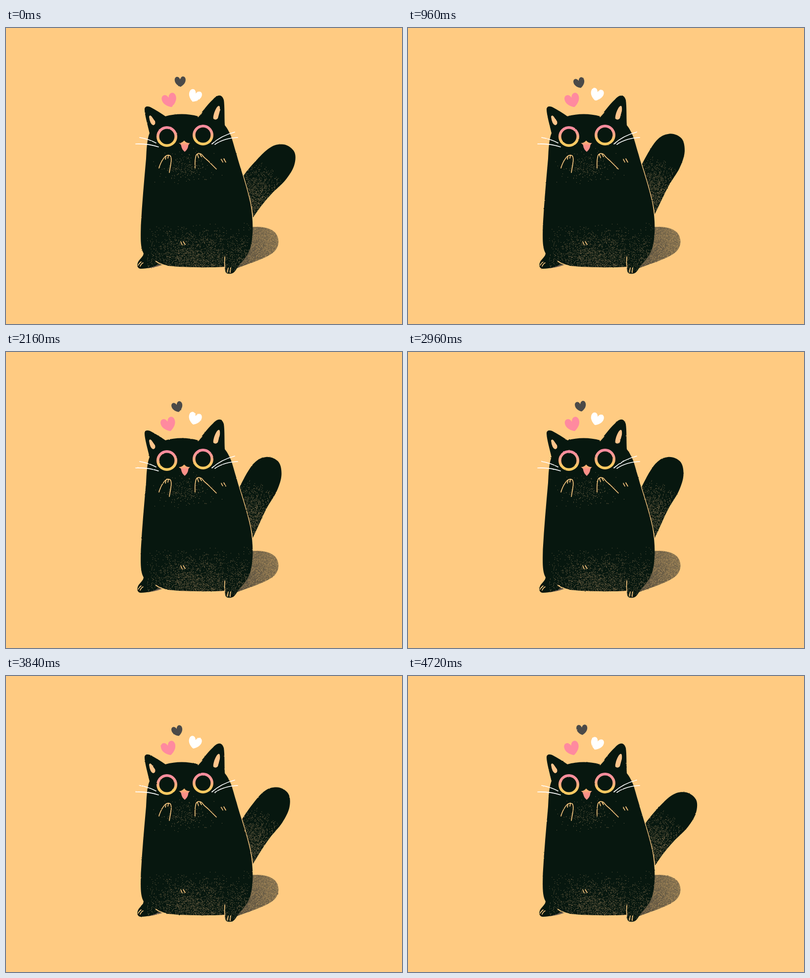
These frames come from a looping animation (800x600 px, 4800 ms). An HTML page:

```html
<!DOCTYPE html>
<html lang="en">
<head>
<meta charset="utf-8">
<title>Cat in love</title>
<style>
html, body { margin: 0; width: 100%; height: 100%; overflow: hidden; background: #ffcb82; }
svg { display: block; width: 100%; height: 100%; }
.line { fill: none; stroke-linecap: round; stroke-linejoin: round; }
</style>
</head>
<body>
<svg viewBox="0 0 800 600">
  <defs>
    <filter id="rough" filterUnits="userSpaceOnUse" x="250" y="85" width="350" height="425" color-interpolation-filters="sRGB">
      <feTurbulence id="noise" type="fractalNoise" baseFrequency=".25" numOctaves="2" seed="1"/>
      <feColorMatrix values="1 0 0 0 0  0 1 0 0 0  0 0 1 0 0  0 0 0 0 1" result="map"/>
      <feDisplacementMap in="SourceGraphic" in2="map" scale="1.8" xChannelSelector="R" yChannelSelector="G"/>
    </filter>
    <linearGradient id="iris" x1="0" y1="0" x2="0" y2="1">
      <stop offset="0" stop-color="#fb8b9f"/>
      <stop offset=".35" stop-color="#fb9f90"/>
      <stop offset=".8" stop-color="#fbca62"/>
    </linearGradient>
    <linearGradient id="nose" x1="0" y1="0" x2="0" y2="1">
      <stop offset=".1" stop-color="#fdb970"/>
      <stop offset=".45" stop-color="#fb8f88"/>
    </linearGradient>
    <linearGradient id="shade" x1="480" y1="470" x2="548" y2="420" gradientUnits="userSpaceOnUse">
      <stop offset="0" stop-color="#5b513f"/>
      <stop offset="1" stop-color="#79694c"/>
    </linearGradient>
    <path id="body" d="M290 213C287 200 280 175 280 165C280 159 285 158 291 160C303 166 313 173 322 179
      C342 173 368 173 388 179C396 171 406 156 418 145C428 134 436 134 440 146C442 160 441 180 442 197
      C447 203 452 212 456 223C460 236 462 244 466 257C472 280 487 322 494 357C500 390 500 425 493 448
      C487 465 475 474 466 488C461 496 458 499 449 498C442 497 443 491 442 484C410 486 375 485 350 484
      C333 483 320 481 309 479C299 484 287 488 272 488C265 487 264 481 267 474C271 467 277 464 278 457
      C271 445 272 425 272.5 400C275 355 279 310 283 265C284 245 285 225 290 213Z"/>
    <path id="heart" d="M0 1C-.5 .78-1.08 .25-1-.4C-.92-1.02-.2-1.08 0-.36C.2-1.08 .92-1.02 1-.4C1.08 .25 .5 .78 0 1Z"/>
    <path id="shadow" d="M480 408C497 400 530 401 543 414C553 425 553 442 542 453C528 466 500 474 466 487Z"/>
    <clipPath id="bodyClip"><use href="#body"/></clipPath>
    <clipPath id="shadowClip"><use href="#shadow"/></clipPath>
    <clipPath id="tailClip"><path id="tailEdge"/></clipPath>
  </defs>

  <rect width="800" height="600" fill="#ffcb82"/>

  <g filter="url(#rough)">
    <use href="#shadow" fill="url(#shade)"/>
    <path d="M275 487Q295 488 316 480L300 476Z" fill="#6b5c50"/>
  </g>
  <path id="shadowGrain" clip-path="url(#shadowClip)" fill="#a88a59"/>

  <path id="tail" fill="#07170f" filter="url(#rough)"/>
  <g clip-path="url(#tailClip)"><path id="tailGrain" fill="#786849"/></g>

  <g filter="url(#rough)">
    <path class="line" d="M466 257C472 280 487 322 494 357C497 370 498 382 498 392" stroke="#ffcb82" stroke-width="2.6"/>
    <use href="#body" fill="#07170f"/>
  </g>
  <path id="bodyGrain" clip-path="url(#bodyClip)" fill="#786849"/>

  <g filter="url(#rough)">
    <path d="M289 180Q290 175 294 179L301 189Q303 196 297 197Q291 195 289 180Z
      M429 158Q433 156 432 168L428 183Q424 188 419 184Q418 180 421 171Q425 160 429 158Z" fill="#ffc58c"/>
    <g fill="#07170f" stroke="url(#iris)" stroke-width="5.6">
      <circle cx="325" cy="220" r="18.2"/>
      <circle cx="398" cy="217" r="18.2"/>
    </g>
    <path d="M349 233Q355 234 360 228Q364 234 372 233Q368 236 368 240Q367 246 361 251Q355 246 354 239Q354 236 349 233Z" fill="url(#nose)"/>
    <g class="line" stroke="#ffcb82" stroke-width="1.6">
      <path d="M309 284Q313 270 321 261Q326 256 332 259Q335 263 333 275L330 293M323 261l-1 5M328 259l-1 5"/>
      <path d="M382 284Q381 268 384 258Q388 252 395 256Q400 263 408 269L425 286M387 257l2 6M392 256l3 5"/>
      <path d="M435 266l3 6M440 265l4 7M353 433l3 7M358 433l4 6"/>
      <path d="M303 473Q311 479 325 482M442 464Q441 475 442 485M388 180L396 171"/>
      <path d="M267 481Q269 477 273 474M271 483Q273 478 277 476M447 495Q448 490 449 486M453 496Q453 491 454 486"/>
    </g>
    <g class="line" stroke="#fff" stroke-width="1.7">
      <path d="M270 222Q288 225 303 233M262 235Q287 234 308 241"/>
      <path d="M416 235Q435 218 462 211M422 236Q441 223 468 222"/>
    </g>
    <use id="dark" href="#heart" fill="#4b4a48"/>
    <use id="pink" href="#heart" fill="#ff8a9f"/>
    <use id="white" href="#heart" fill="#fff"/>
  </g>
</svg>
<script>
const STEP = 80, LOOP = 4800, SWING = 800, DRIFT = 1600;
const PIVOT = [454, 362];
const $ = id => document.getElementById(id);
const wave = (t, period) => Math.cos(2 * Math.PI * t / period);

// Tail outline at its lowest, from the left root round the tip
const tailPoints = [[466, 335], [481, 299], [530, 247], [562, 237.5], [584, 253],
  [583, 281], [565, 310], [537, 337], [516, 361]];

// Catmull-Rom curve through the points
function smooth(pts) {
  const p = i => pts[Math.max(0, Math.min(pts.length - 1, i))];
  const mix = (a, b, c) => a.map((v, k) => (v + (b[k] - c[k]) / 6).toFixed(2));
  let d = "M" + pts[0];
  for (let i = 0; i < pts.length - 1; i++)
    d += `C${mix(p(i), p(i + 1), p(i - 1))} ${mix(p(i + 1), p(i), p(i + 2))} ${p(i + 1)}`;
  return d;
}

function rotate([x, y], deg) {
  const a = deg * Math.PI / 180, c = Math.cos(a), s = Math.sin(a);
  const dx = x - PIVOT[0], dy = y - PIVOT[1];
  return [PIVOT[0] + dx * c - dy * s, PIVOT[1] + dx * s + dy * c];
}

function random(seed) {
  return () => {
    seed = seed + 0x6D2B79F5 | 0;
    let v = Math.imul(seed ^ seed >>> 15, seed | 1);
    v ^= v + Math.imul(v ^ v >>> 7, v | 61);
    return ((v ^ v >>> 14) >>> 0) / 4294967296;
  };
}

function grain(id, seed, [x, y, w, h], density) {
  const rnd = random(seed);
  let d = "";
  for (let i = 0; i < w * h; i++) {
    const px = x + rnd() * w, py = y + rnd() * h;
    if (rnd() < density(px, py)) d += `M${px.toFixed(1)} ${py.toFixed(1)}h1v1h-1z`;
  }
  $(id).setAttribute("d", d);
}

const bell = (v, mid, spread) => Math.exp(-(((v - mid) / spread) ** 2));

grain("bodyGrain", 7, [285, 240, 215, 260], (x, y) => {
  const belly = 0.32 * Math.min(1, Math.max(0, y - 395) / 80) ** 1.2 * bell(x, 380, 75);
  const chin = 0.1 * bell(x, 360, 34) * bell(y, 283, 20);
  const leg = 0.12 * bell(x, 478, 20) * bell(y, 455, 30);
  return belly + chin + leg;
});
grain("tailGrain", 21, [445, 250, 120, 150], (x, y) =>
  0.4 * Math.max(0, 1 - Math.hypot(x - 498, y - 350) / 82) ** 1.2);
grain("shadowGrain", 43, [465, 400, 90, 90], (x, y) =>
  Math.max(0.1, 0.22 + (x - 490) / 180));

function place(id, size, x, y, tilt) {
  $(id).setAttribute("transform", `translate(${x} ${y}) rotate(${tilt}) scale(${size})`);
}

function draw(t) {
  const turn = -15 + 14.8 * wave(t + 35, SWING);
  const tip = tailPoints.map(p => rotate(p, turn));
  const edge = smooth([...tip, [498, 386 + turn * 0.5]]) + "L470 380Z";
  $("tail").setAttribute("d", edge);
  $("tailEdge").setAttribute("d", edge);
  $("tailGrain").setAttribute("transform", `rotate(${turn} ${PIVOT})`);

  const hop = ((1 + wave(t - 15, DRIFT)) / 2) ** 3;
  const sway = wave(t + DRIFT / 4, DRIFT);
  place("dark", 11, 346 + 6 * hop, 111 - 2.7 * hop, -17 + 14 * hop);
  place("pink", 14.6, 330.3 + 2.8 * sway, 146.2, -17);
  place("white", 13, 381.7, 134.5 + 2.8 * hop, 16 + 5 * hop);
}

const start = performance.now();
let last = -1;
function tick() {
  const step = Math.floor((performance.now() - start) % LOOP / STEP);
  if (step !== last) {
    draw(step * STEP);
    $("noise").setAttribute("seed", step + 1);
  }
  last = step;
  requestAnimationFrame(tick);
}
tick();
</script>
</body>
</html>
```
